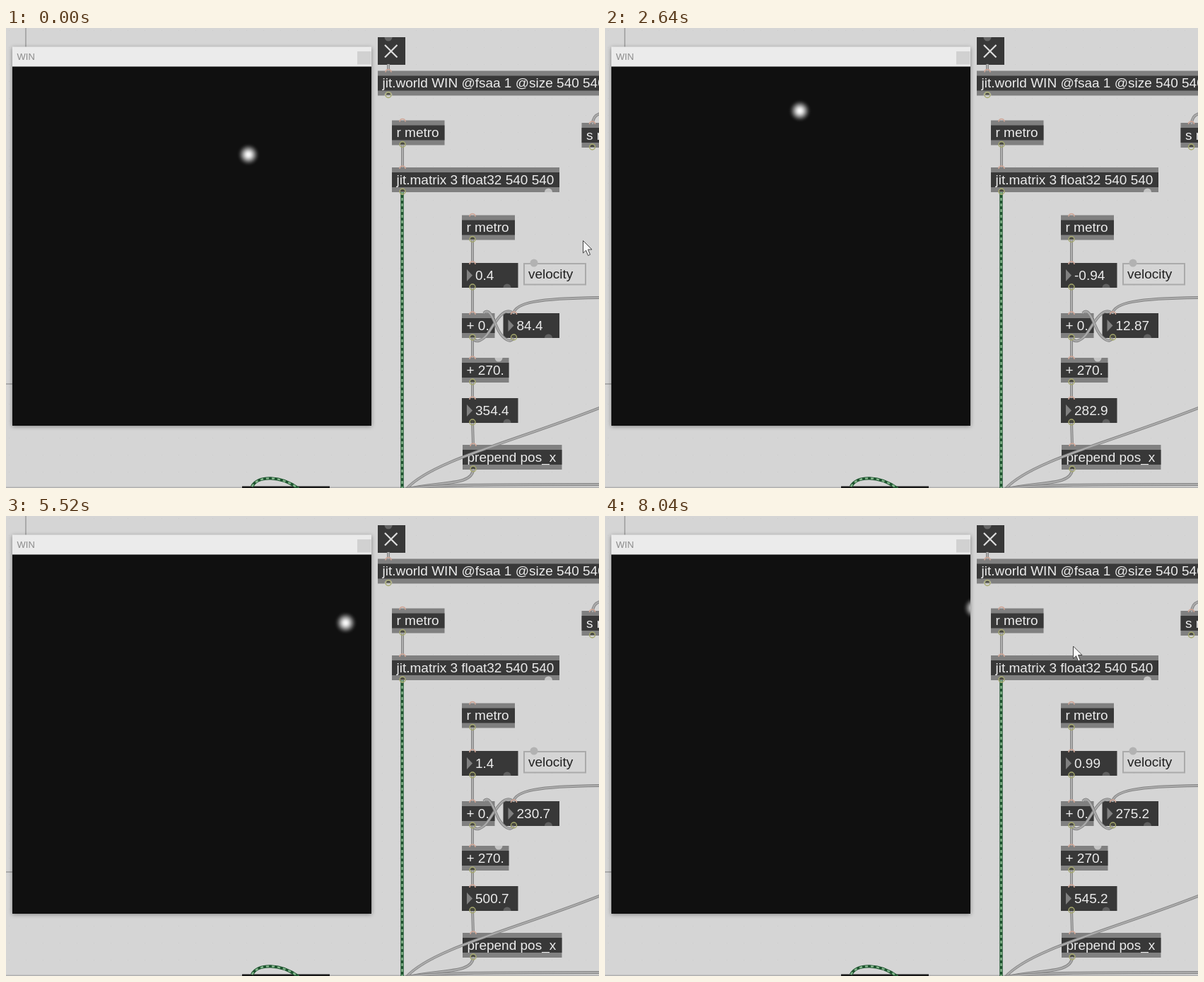
Animation, 839 px wide and 650 px high, one loop 8.08 s. Source, as an HTML page with a canvas:

```html
<!DOCTYPE html>
<html lang="en">
<head>
<meta charset="utf-8">
<title>Patch</title>
<style>
html, body { margin: 0; width: 100%; height: 100%; overflow: hidden; background: #d5d5d5; }
canvas { display: block; }
</style>
</head>
<body>
<canvas id="stage" width="839" height="650"></canvas>
<script>
const ctx = document.getElementById('stage').getContext('2d');
const FAMILY = '"Liberation Sans", Arial, sans-serif';
const LOOP = 8080, STEP = 40, TICKS_PER_MS = 0.245;
const DARK = '#383838', STRIP = '#808080', PALE = '#c4c4c4';
const PORT = 15, HEIGHT = 35;

const LAUNCHES = [
  { start: -861, speed: 0.129 },
  { start: 448.2, speed: 0.2342, gravity: 7.085e-5 },
  { start: 3875, speed: 0.0845 },
  { start: 5545, speed: 0.141 },
  { start: 6905.4, speed: 0.141 }
];

const ramp = (t, from, to) => Math.min(1, Math.max(0, (t - from) / (to - from)));
const mix = (a, b, k) => a + (b - a) * k;
const bump = k => Math.sin(Math.PI * k);

// The velocity box is dragged three times.
function velocity(t) {
  const sway = ramp(t, 2640, 3800);
  return 0.4 - 1.34 * ramp(t, 1409.9, 2640)
    + 0.0799 * sway - 0.2411 * bump(sway * sway)
    + 2.2601 * ramp(t, 4415, 4800) + 0.589 * bump(ramp(t, 4415, 5200))
    - 0.41 * ramp(t, 6091, 6450);
}

// Each metro tick adds the velocity to the position.
function ballState(t) {
  const { start, speed, gravity = 0 } = LAUNCHES.filter(l => l.start <= t).pop();
  const age = t - start, ticks = Math.round(age * TICKS_PER_MS);
  let x = 0;
  for (let i = 0; i < ticks; i++) x += velocity(start + (i + 0.5) / TICKS_PER_MS);
  return { v: velocity(t), x, y: 290 - speed * age + gravity * age * age };
}

function format(n) {
  const digits = String(Math.floor(Math.abs(n))).length;
  const s = n.toFixed(Math.max(0, 4 - digits));
  const exact = Math.abs(n * 100 - Math.round(n * 100)) < 1e-5;
  return exact ? s.replace(/0+$/, '') : s;
}

function rect(x, y, w, h, color) {
  ctx.fillStyle = color;
  ctx.fillRect(x, y, w, h);
}

function label(s, x, y, color = '#ececec', size = 19) {
  ctx.font = `${size}px ${FAMILY}`;
  ctx.fillStyle = color;
  ctx.fillText(s, x, y);
}

function dot(x, y, color, from = 0, sweep = Math.PI) {
  ctx.fillStyle = color;
  ctx.beginPath();
  ctx.arc(x, y, 5.5, from, from + sweep);
  ctx.fill();
}

function stroke(d, color, width, dash = []) {
  ctx.strokeStyle = color;
  ctx.lineWidth = width;
  ctx.setLineDash(dash);
  ctx.stroke(new Path2D(d));
  ctx.setLineDash([]);
}

function cable(d) {
  stroke(d, '#858585', 4);
  stroke(d, '#adadad', 2);
}

function matrixCable(d) {
  stroke(d, '#1f5530', 4.4);
  stroke(d, '#86b88e', 2.4, [4, 4]);
}

function object(text, x, y, w) {
  rect(x, y, w, HEIGHT, STRIP);
  rect(x, y + 7, w, HEIGHT - 14, DARK);
  label(text, x + 6.5, y + 23.5);
  return { x: x + PORT, top: y, bottom: y + HEIGHT };
}

function numberBox(value, x, y) {
  rect(x, y, 79.5, HEIGHT, DARK);
  ctx.fillStyle = STRIP;
  ctx.fill(new Path2D(`M${x + 7} ${y + 9} l8 8.5 l-8 8.5 Z`));
  dot(x + 64, y + HEIGHT, '#606060', Math.PI);
  label(format(value), x + 19, y + 23.5);
  return { x: x + PORT, top: y, bottom: y + HEIGHT };
}

function link(a, b) {
  cable(`M${a.x} ${a.bottom} L${b.x} ${b.top}`);
}

function ports({ x, top, bottom }) {
  stroke(`M${x - 4} ${top + 2} a4 4 0 0 1 8 0`, '#d0a595', 1.6);
  ctx.fillStyle = '#4a4a40';
  ctx.fill(new Path2D(`M${x - 3} ${bottom - 1} a3 3 0 0 1 6 0 Z`));
  stroke(`M${x - 4} ${bottom - 1} a4 4 0 0 1 8 0 a4 4 0 0 1 -8 0`, '#a5a86c', 1.4);
}

function drawBackground() {
  rect(0, 0, 839, 650, '#d5d5d5');
  for (let x = 4; x < 839; x += 24) {
    for (let y = 3; y < 650; y += 24) rect(x, y, 1, 1, '#cdcdcd');
  }
  rect(27, 0, 2, 27, '#aaa');
  rect(0, 502, 9, 2, '#aaa');
  rect(0, 648.5, 839, 1.5, '#b0b0b0');
}

function drawWindow(x, y) {
  ctx.save();
  ctx.shadowColor = 'rgba(0,0,0,.4)';
  ctx.shadowBlur = 6;
  ctx.shadowOffsetY = 1;
  rect(9, 27, 508, 535, '#101010');
  ctx.restore();
  rect(9, 26.5, 508, 28, '#ebebeb');
  rect(497, 33, 19.5, 18.5, '#d1d1d1');
  label('WIN', 15.5, 45, '#8b8b8b', 13);

  ctx.save();
  ctx.beginPath();
  ctx.rect(9, 55, 508, 507);
  ctx.clip();
  const radius = 16.5;
  const glow = ctx.createRadialGradient(x, y, 0, x, y, radius);
  for (let k = 0; k <= 1; k += 0.125) {
    glow.addColorStop(k, `rgba(250,250,250,${(1 + Math.cos(Math.PI * k)) / 2})`);
  }
  ctx.fillStyle = glow;
  ctx.fillRect(x - radius, y - radius, 2 * radius, 2 * radius);
  ctx.restore();
}

function drawPatch(v, x) {
  rect(526, 13, 39, 39, DARK);
  dot(541, 13, '#666');
  stroke('M536 24 l17.5 17.5 m0 -17.5 l-17.5 17.5', '#dedede', 2.2);
  ctx.strokeStyle = '#aaa';
  ctx.lineWidth = 2;
  ctx.strokeRect(733, 333, 87, 29.5);
  dot(747, 332, '#b2b2b2', 0, 7);
  label('velocity', 739, 354, '#222');
  rect(334, 647.5, 124, 3, '#181818');

  const toggle = { x: 541, top: 13, bottom: 51 };
  const world = object('jit.world WIN @fsaa 1 @size 540 540', 526, 60.5, 330);
  const send = object('s metro', 814.5, 134, 80);
  const metro = object('r metro', 546, 130.5, 74.5);
  const matrix = object('jit.matrix 3 float32 540 540', 546, 197, 237);
  const chain = [
    object('r metro', 645, 264.5, 75),
    numberBox(v, 645, 332),
    object('+ 0.', 645, 403, 46.5),
    object('+ 270.', 645, 466, 66.5),
    numberBox(x + 270, 645, 523),
    object('prepend pos_x', 646, 589, 140.5)
  ];
  const position = numberBox(x, 703.5, 403);
  dot(world.x, world.bottom, PALE, Math.PI);
  dot(767.5, matrix.bottom, PALE, Math.PI);
  dot(697, 466, PALE);

  link(toggle, world);
  link(metro, matrix);
  chain.slice(1).forEach((box, i) => link(chain[i], box));
  cable('M661 438 C664 446 675 442 683 430 C692 416 704 394 716 402');
  cable('M718 438 C714 446 704 440 697 428 C690 414 684 393 676 403');
  cable('M718 404 C720 388 752 382 839 381');
  cable('M830 136 C830 128 834 123 840 121');
  cable('M661 623 C661 648 610 640 566 652');
  cable('M566 652 C600 612 720 584 842 536');
  cable('M566 651 C610 645 690 645 842 645');
  matrixCable(`M${matrix.x - 0.5} ${matrix.bottom} V652`);
  matrixCable('M348 648 C356 632 389 632 414 651');
  [world, send, metro, matrix, position, ...chain].forEach(ports);
}

function drawPointer(t) {
  let x, y;
  if (t < 1410) {
    const k = ramp(t, 200, 1240);
    x = mix(816, 736, k);
    y = mix(300, 351, k);
  } else if (t >= 7840) {
    const k = ramp(t, 7840, 8040);
    x = mix(820, 662, k);
    y = mix(250, 183.5, k);
  } else return;
  ctx.save();
  ctx.translate(x, y);
  const arrow = 'M.5 .5 V18 L4.6 14.2 L7.5 21.5 L10.5 20.2 L7.5 13 H13 Z';
  ctx.fillStyle = '#fafafa';
  ctx.fill(new Path2D(arrow));
  stroke(arrow, '#444', 1);
  ctx.restore();
}

// The picture advances in steps, after a short rest at the start of the loop.
function steppedTime(ms) {
  const t = Math.floor((ms % LOOP) / STEP + 1e-6) * STEP;
  return t < 200 ? 0 : t;
}

function frame() {
  const t = steppedTime(performance.now() - began);
  const { v, x, y } = ballState(t);
  drawBackground();
  drawWindow(263.6 + x * 508 / 540, y);
  drawPatch(v, x);
  drawPointer(t);
  requestAnimationFrame(frame);
}

const began = performance.now();
frame();
</script>
</body>
</html>
```
